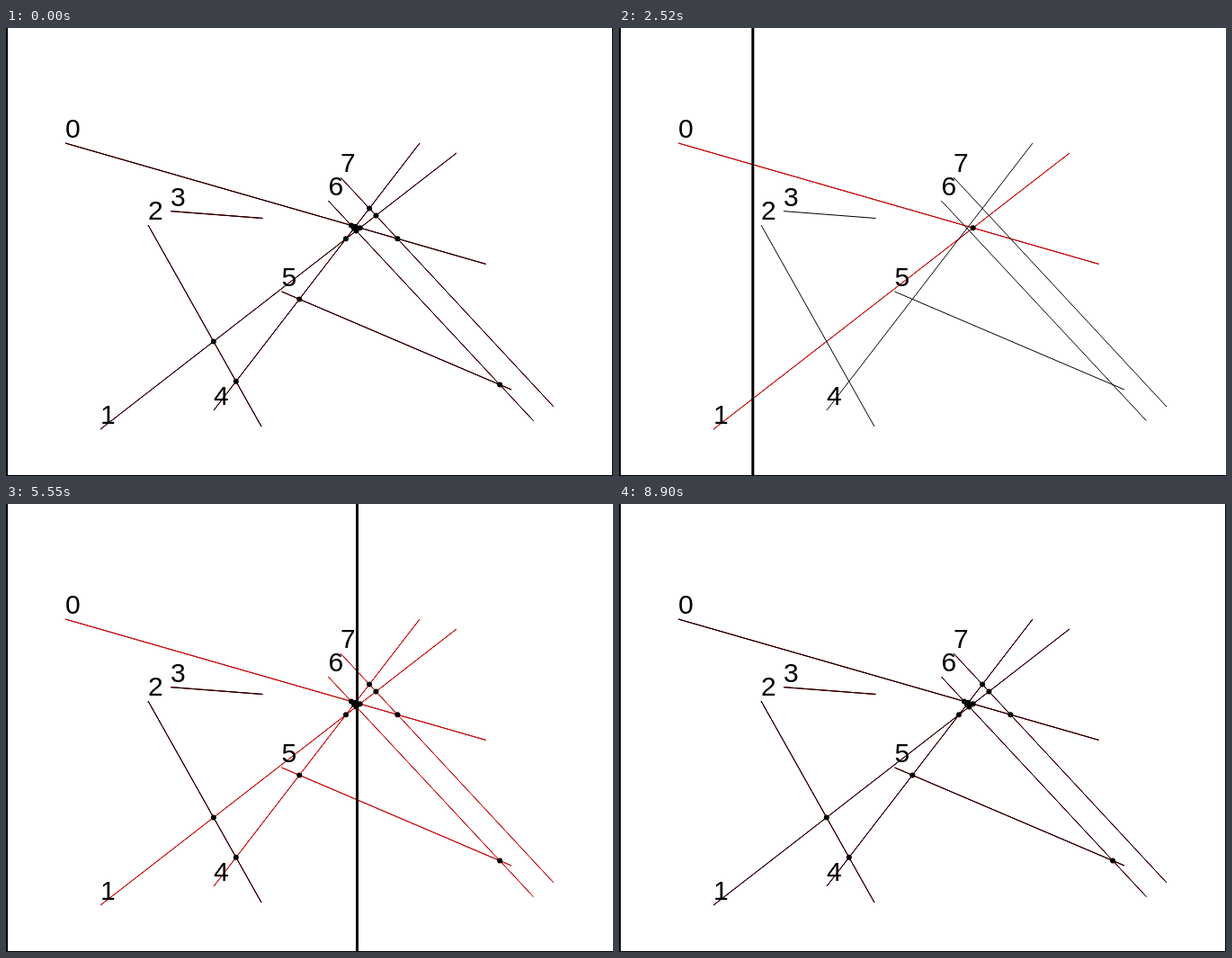
An HTML page that plays this animation: 675 by 498 pixels, repeating every 9050 ms.

```html
<!DOCTYPE html>
<html lang="en">
<head>
<meta charset="utf-8">
<title>Sweep line over segments</title>
<style>
  html, body { margin: 0; width: 100%; height: 100%; overflow: hidden; background: #fff; }
  svg { display: block; }
  text { font: 30px "Liberation Sans", Arial, sans-serif; }
</style>
</head>
<body>
<svg id="stage" width="675" height="498" viewBox="0 0 675 498">
  <rect width="675" height="498" fill="#fff"/>
</svg>
<script>
const LOOP = 9050;
const START = 750, END = 8900;
const LAST_STEP = 103;

// The sweep ticks slightly faster after the busiest crossings
const PACE_STEP = 60, PACE_TIME = 5550;

// Segments: x1, y1, x2, y2, ordered left to right
const segments = [
  [66, 128, 533.5, 262.4],
  [105, 446, 501, 139],
  [158, 219, 284, 443],
  [183, 203.6, 285.5, 211.5],
  [231, 425, 460, 128],
  [306.5, 293, 562, 402],
  [358.4, 192, 586.4, 436.5],
  [372, 166, 609, 421]
];

// Sweep position at a few steps
const sweepKeys = [[0, 7], [12, 83], [48, 320], [PACE_STEP, 390.5], [83, 536.5], [LAST_STEP, 675.5]];

const stage = document.getElementById("stage");

function add(tag, attrs, content = "") {
  const node = document.createElementNS("http://www.w3.org/2000/svg", tag);
  for (const name in attrs) node.setAttribute(name, attrs[name]);
  node.textContent = content;
  return stage.appendChild(node);
}

const addLine = ([x1, y1, x2, y2], stroke, width = 1) =>
  add("line", { x1, y1, x2, y2, stroke, "stroke-width": width });

const show = (node, visible) => node.setAttribute("visibility", visible ? "visible" : "hidden");

// Crossing point of two segments, or null when they do not meet
function intersect(a, b) {
  const slope = ([x1, y1, x2, y2]) => (y2 - y1) / (x2 - x1);
  const ma = slope(a), mb = slope(b);
  const cx = (b[1] - a[1] + ma * a[0] - mb * b[0]) / (ma - mb);
  const within = cx >= Math.max(a[0], b[0]) && cx <= Math.min(a[2], b[2]);
  return within ? { cx, cy: a[1] + ma * (cx - a[0]) } : null;
}

// Each state is painted over the previous one, so finished lines keep a red fringe
const strokes = segments.map(s => {
  addLine(s, "#000");
  return { start: s[0], end: s[2], active: addLine(s, "#f00"), done: addLine(s, "#000") };
});

// A crossing is revealed once the sweep has reached both of its segments
const dots = [];
segments.forEach((b, j) => segments.slice(0, j).forEach(a => {
  const point = intersect(a, b);
  if (point) dots.push({ found: b[0], node: add("circle", { ...point, r: 3 }) });
}));

segments.forEach(([x, y], i) => add("text", { x, y: Math.round(y) - 6 }, i));

const sweep = addLine([0, 0, 0, 498], "#000", 3);
add("rect", { width: 2, height: 498 });
add("rect", { y: 497, width: 675, height: 1 });

function stepAt(time) {
  if (time < START || time >= END) return LAST_STEP;
  const step = time < PACE_TIME
    ? PACE_STEP * (time - START) / (PACE_TIME - START)
    : PACE_STEP + (LAST_STEP - PACE_STEP) * (time - PACE_TIME) / (END - PACE_TIME);
  return Math.floor(step);
}

function sweepAt(step) {
  const i = Math.max(1, sweepKeys.findIndex(([key]) => key >= step));
  const [k0, x0] = sweepKeys[i - 1], [k1, x1] = sweepKeys[i];
  return x0 + (x1 - x0) * (step - k0) / (k1 - k0);
}

function render(time) {
  const x = sweepAt(stepAt(time));
  sweep.setAttribute("x1", x);
  sweep.setAttribute("x2", x);
  for (const { start, end, active, done } of strokes) {
    show(active, x >= start);
    show(done, x >= end);
  }
  for (const { found, node } of dots) show(node, x >= found);
}

const origin = performance.now();
function tick() {
  render((performance.now() - origin) % LOOP);
  requestAnimationFrame(tick);
}
tick();
</script>
</body>
</html>
```
